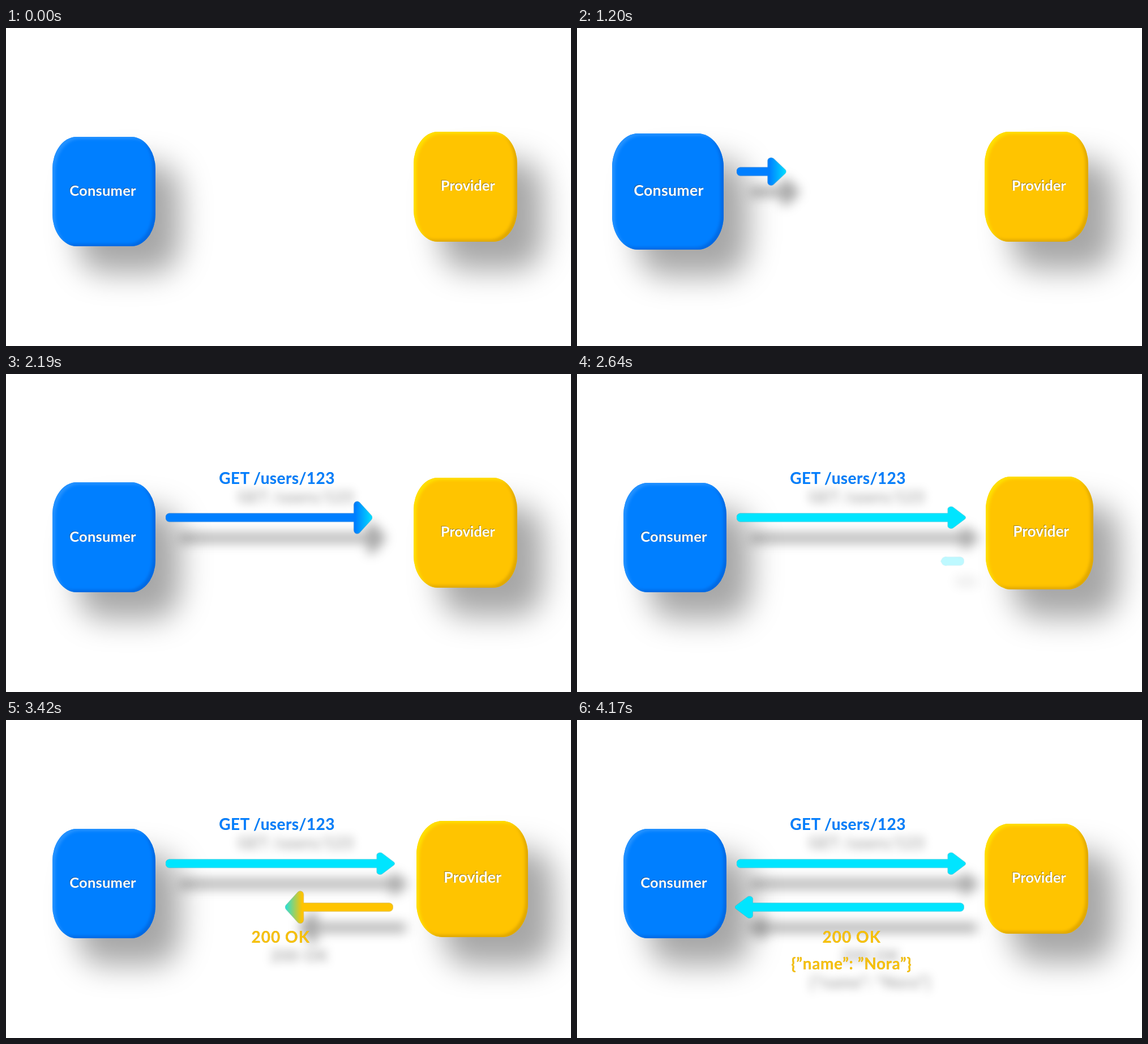
Recreate the animation shown at these times as an HTML page. Size 998x561 px, loop 6300 ms.

```html
<!DOCTYPE html>
<html lang="en">
<head>
<meta charset="utf-8">
<title>Request and response</title>
<style>
  html, body { margin: 0; width: 100%; height: 100%; overflow: hidden; background: #fff; }
  .box { position: absolute; }
  #consumer {
    background: #007fff;
    box-shadow: inset 5px 4px 5px #2492ff, inset -5px -4px 5px #0069e2,
      44px 47px 54px rgba(0, 0, 0, .35);
  }
  #provider {
    background: #ffc400;
    box-shadow: inset 5px 4px 5px #ffdf00, inset -5px -4px 5px #e0a800,
      46px 50px 54px rgba(0, 0, 0, .35);
  }
  svg { position: absolute; left: 0; top: 0; }
  text { font: 700 28px Lato, "Open Sans", sans-serif; text-anchor: middle; }
  .label { font-size: 25.4px; fill: #fff; filter: drop-shadow(-.7px -.8px 0 rgba(60, 60, 60, .5)); }
  .blue { fill: #007fff; }
  .gold { fill: #f8c106; }
  .cast { filter: drop-shadow(.6px .7px 0 rgba(60, 50, 0, .45)) drop-shadow(33px 33px 8px rgba(0, 0, 0, .33)); }
  .arrow { filter: drop-shadow(0 .8px 0 rgba(0, 40, 60, .4)) drop-shadow(24px 36px 10px rgba(0, 0, 0, .34)); }
  .head { stroke-width: 12px; stroke-linejoin: round; }
</style>
</head>
<body>
<div class="box" id="consumer"></div>
<div class="box" id="provider"></div>

<svg width="998" height="561" viewBox="0 0 998 561">
  <defs>
    <linearGradient id="edge">
      <stop offset=".913" stop-color="#fff"/>
      <stop offset="1" stop-color="#fff" stop-opacity="0"/>
    </linearGradient>
    <linearGradient id="tintA" gradientUnits="userSpaceOnUse" x1="-29" x2="3">
      <stop/><stop offset="1" stop-color="#00e5ff"/>
    </linearGradient>
    <linearGradient id="tintB" gradientUnits="userSpaceOnUse" x1="-29" x2="6">
      <stop/><stop offset="1" stop-color="#00e5ff"/>
    </linearGradient>
    <mask id="wipeGet" maskUnits="userSpaceOnUse" x="0" y="0" width="998" height="561">
      <rect x="-600" width="600" height="561" fill="url(#edge)"/>
    </mask>
    <mask id="wipeOk" maskUnits="userSpaceOnUse" x="0" y="0" width="998" height="561">
      <rect x="-600" width="600" height="561" fill="url(#edge)"/>
    </mask>
    <mask id="wipeBody" maskUnits="userSpaceOnUse" x="0" y="0" width="998" height="561">
      <rect x="-600" width="600" height="561" fill="url(#edge)"/>
    </mask>
  </defs>

  <g class="arrow" id="request">
    <g transform="translate(282 253.2)">
      <rect class="shaft" y="-7.5" height="15" rx="6.5"/>
      <path class="head" d="M-25.5-22.5L-5 0L-25.5 22.5Z" fill="url(#tintA)" stroke="url(#tintA)"/>
    </g>
  </g>
  <g class="arrow" id="response">
    <g transform="translate(683.5 330.2) scale(-1 1)">
      <rect class="shaft" y="-7.5" height="15" rx="6.5"/>
      <path class="head" d="M-25.5-22.5L-5 0L-25.5 22.5Z" fill="url(#tintB)" stroke="url(#tintB)"/>
    </g>
  </g>

  <g class="cast"><g mask="url(#wipeGet)">
    <text class="blue" x="478.5" y="193.5" letter-spacing=".4">GET /users/123</text>
  </g></g>
  <g class="cast"><g mask="url(#wipeOk)">
    <text class="gold" x="485.2" y="393" letter-spacing="1">200 OK</text>
  </g></g>
  <g class="cast"><g mask="url(#wipeBody)">
    <text class="gold" x="484.8" y="440" letter-spacing=".6">{”name”: ”Nora”}</text>
  </g></g>

  <g id="consumerLabel"><text class="label" y="8.5" letter-spacing=".3">Consumer</text></g>
  <g id="providerLabel"><text class="label" y="8.5">Provider</text></g>
</svg>

<script>
const LOOP = 6300;
const OUT = 'cubic-bezier(.33, 1, .68, 1)';
const CYAN = '#00e5ff';
const find = s => document.querySelector(s);

// frames: [time in ms, properties, easing to the next frame]
function play(el, frames) {
  const first = frames[0], last = frames[frames.length - 1];
  const all = [[0, first[1]], ...frames, [LOOP, last[1]]];
  el.animate(
    all.map(([t, props, easing = 'linear']) => ({ offset: t / LOOP, easing, ...props })),
    { duration: LOOP, iterations: Infinity }
  );
}

function pulse(el, rest, peak, [up, upEnd, down, downEnd]) {
  play(el, [[up, rest, OUT], [upEnd, peak], [down, peak, OUT], [downEnd, rest]]);
}

const box = (x, y, w, h, rx, ry) => ({
  left: x + 'px', top: y + 'px', width: w + 'px', height: h + 'px',
  borderRadius: `${rx}px / ${ry}px`
});
const place = (x, y, s) => ({ transform: `translate(${x}px, ${y}px) scale(${s})` });

const callTimes = [262, 900, 1568, 2210];
pulse(find('#consumer'), box(81.8, 191.5, 182.7, 193.5, 43, 57), box(61.8, 186, 197, 204.7, 46, 60), callTimes);
pulse(find('#consumerLabel'), place(171, 287, 1), place(162, 287, 1.05), callTimes);

const replyTimes = [2517, 3150, 3680, 4170];
pulse(find('#provider'), box(720, 183.3, 182.7, 194, 43, 57), box(725, 178.2, 197, 204.5, 46, 60), replyTimes);
pulse(find('#providerLabel'), place(815.7, 278.2, 1), place(824, 278.2, 1.06), replyTimes);

function growArrow(id, tint, color, start) {
  const at = (ms, props) => [start + ms, props];
  const group = find(id);
  // [ms, tip distance, head scale x, head scale y]
  const path = [
    [0, 40, .3, .26], [130, 47, .7, .5], [400, 86, 1, .86], [790, 189, 1, 1],
    [1000, 254, 1, 1], [1420, 372, 1, 1], [1540, 403.5, .97, .67]
  ];
  play(group, [at(-40, { opacity: 0 }), at(160, { opacity: 1 })]);
  play(group.querySelector('.shaft'), path.map(([ms, d, sx]) =>
    at(ms, { width: d - 18 * (sx - .3) / .7 + 'px' })));
  play(group.querySelector('.head'), path.map(([ms, d, sx, sy]) =>
    at(ms, { transform: `translate(${d}px, 0px) scale(${sx}, ${sy})` })));

  const hues = [[60, CYAN], [300, color], [1420, color], [1540, CYAN]];
  play(group.querySelector('.shaft'), hues.map(([ms, fill]) => at(ms, { fill })));
  play(find(tint + ' stop'), hues.map(([ms, stopColor]) => at(ms, { stopColor })));
}
growArrow('#request', '#tintA', '#007fff', 800);
growArrow('#response', '#tintB', '#ffc400', 2630);

function wipe(id, from, to, start, end) {
  const flip = Math.sign(to - from);
  const front = x => ({ transform: `translate(${x}px, 0px) scale(${flip}, 1)` });
  play(find(id + ' rect'), [[start, front(from)], [end, front(to)]]);
}
wipe('#wipeGet', 374, 636, 1200, 1970);
wipe('#wipeOk', 540, 376, 3080, 3420);
wipe('#wipeBody', 604, 312, 3440, 4140);
</script>
</body>
</html>
```
